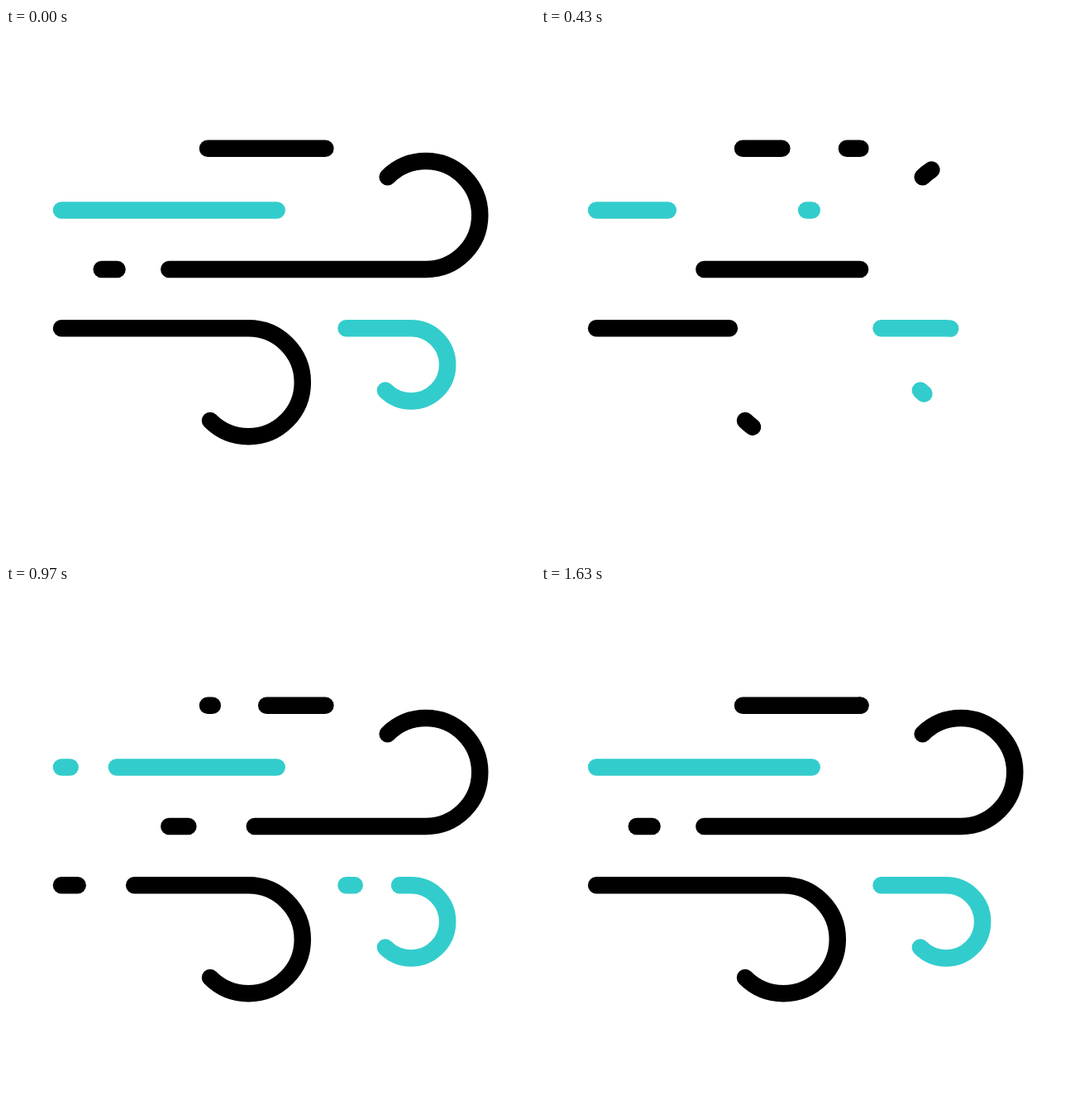
Recreate the animation shown at these times as an HTML page with a canvas. Size 640 px wide and 640 px high, loop 1670 ms.

```html
<!DOCTYPE html>
<html lang="en">
<head>
<meta charset="utf-8">
<title>Wind</title>
<style>
  html, body { margin: 0; width: 100%; height: 100%; overflow: hidden; background: #fff; }
  canvas { display: block; width: 640px; height: 640px; }
</style>
</head>
<body>
<canvas id="stage" width="640" height="640"></canvas>
<script>
const ctx = document.getElementById('stage').getContext('2d');
const LOOP = 1670, FRAME = 100 / 3, LAST = 49;
const BLACK = '#000', CYAN = '#33cccc';
const SOFT = 0.25, STRONG = 0.52;

// Symmetric cubic-bezier(p, 0, 1 - p, 1), solved by bisection.
function ease(x, p) {
  if (x <= 0) return 0;
  if (x >= 1) return 1;
  let lo = 0, hi = 1;
  for (let i = 0; i < 24; i++) {
    const s = (lo + hi) / 2, r = 1 - s;
    if (3 * r * r * s * p + 3 * r * s * s * (1 - p) + s * s * s < x) lo = s; else hi = s;
  }
  return lo * lo * (3 - 2 * lo);
}
const tween = (frame, [from, to, p]) => ease((frame - from) / (to - from), p);

// A straight gust, optionally ending in a 225° curl: turn 1 bends down, -1 bends up.
function gust(color, x1, x2, y, timing, radius = 0, turn = 1) {
  const path = new Path2D();
  path.moveTo(x1, y);
  path.lineTo(x2, y);
  if (radius) {
    const start = -turn * Math.PI / 2;
    path.arc(x2, y + turn * radius, radius, start, start + turn * Math.PI * 1.25, turn < 0);
  }
  return { color, path, length: x2 - x1 + radius * Math.PI * 1.25, ...timing };
}

// Tail (leaving) and head (arriving) spans, in frames, for the two passes.
const commonHeads = [[3, 27, STRONG], [25, 49, STRONG]];
const makeTiming = (tail1, tail2, heads = commonHeads, rest = 1) =>
  ({ tails: [tail1, tail2], heads, rest });
const cyanTiming = makeTiming([0, 15, STRONG], [24, 40, SOFT]);
const curlTiming = makeTiming([0, 15, STRONG], [25, 41, SOFT]);
const upperTiming = makeTiming([0, 16, SOFT], [21, 37, SOFT], commonHeads, 0.993);
const dashTiming = makeTiming([0, 8, STRONG], [21, 29, STRONG], [[13, 24, STRONG], [32, 42, STRONG]]);

const gusts = [
  gust(BLACK, 244, 386.4, 145.7, upperTiming),
  gust(CYAN, 67, 327.7, 220.4, cyanTiming),
  gust(BLACK, 115.7, 134.5, 291.9, dashTiming),
  gust(BLACK, 197.3, 507.9, 291.9, curlTiming, 65.4, -1),
  gust(BLACK, 67, 293.3, 363.3, curlTiming, 65.5),
  gust(CYAN, 411.5, 490.1, 363.3, cyanTiming, 44.1)
];

function drawPart(g, from, to) {
  if (to <= from) return;
  ctx.strokeStyle = g.color;
  ctx.setLineDash([(to - from) * g.length, 2000]);
  ctx.lineDashOffset = -from * g.length;
  ctx.stroke(g.path);
}

function render(time) {
  const frame = Math.min(LAST, Math.floor((time % LOOP + 5) / FRAME));
  ctx.clearRect(0, 0, 640, 640);
  ctx.lineWidth = 20.5;
  ctx.lineCap = 'round';
  for (const g of gusts) {
    const [tail1, tail2] = g.tails.map(span => tween(frame, span));
    const [head1, head2] = g.heads.map(span => tween(frame, span));
    drawPart(g, tail1, 1);
    drawPart(g, Math.min(tail2, g.rest), head1);
    drawPart(g, 0, head2);
  }
}

const began = performance.now();
function tick() {
  render(performance.now() - began);
  requestAnimationFrame(tick);
}
tick();
</script>
</body>
</html>
```
